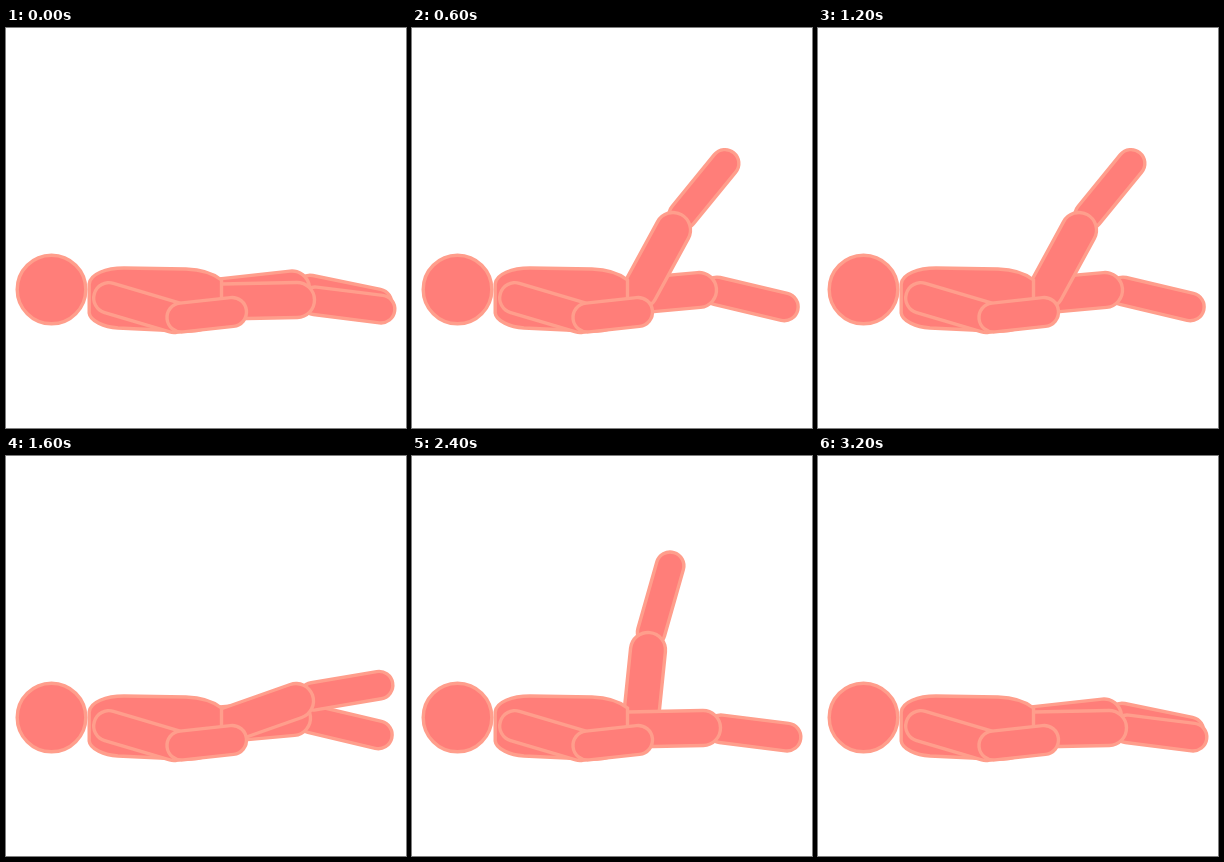
Write an HTML page with a canvas that moves like this. It is 400 px wide and 400 px high and loops after 3400 ms.

```html
<!DOCTYPE html>
<html lang="en">
<head>
<meta charset="utf-8">
<title>Leg raises</title>
<style>
html, body { margin: 0; width: 100%; height: 100%; overflow: hidden; background: #fff; }
canvas { display: block; width: 400px; height: 400px; }
</style>
</head>
<body>
<canvas id="stage" width="400" height="400"></canvas>
<script>
const ctx = document.getElementById('stage').getContext('2d');
const SKIN = '#ff7e79', EDGE = '#ff9e8c', LINE = 3.4;
const LOOP = 3400, STEP = 200;
const THIGH_R = 19.2, SHIN_R = 15.5, KNEE_GAP = 18;
const HIP_UP = [229, 262];

// Knee x, y and direction to the foot in degrees, from lying to upright
const near = {
  hip: [216, 273.5], reach: 84.5,
  keys: [[291, 272, -6.2], [290, 245, 10.8], [281, 216, 30], [261, 202, 52], [232, 194.5, 85.6]]
};
const far = {
  hip: [213, 268.5], reach: 87,
  keys: [[286, 260.5, -9.5], [275, 237, 11.7], [267, 208.5, 42], [236, 194, 75.3]]
};
// The far leg sags a little while the near one works
const SAG = [287, 262, -11.2];

const head = new Path2D();
head.arc(45.5, 261.5, 34.3, 0, Math.PI * 2);

const torso = new Path2D(
  'M83.2 256 C84 246 100 240 118 240 L180 241 C196 241.5 208 246 215.5 252 ' +
  'L215.5 276 C215 294 200 303 185 303 L165 302.5 L112 300 ' +
  'C98 299 84 293 83.2 285 Z');

const mix = (a, b, u) => a + (b - a) * u;

function limb(x1, y1, x2, y2, r) {
  ctx.lineCap = 'round';
  for (const [color, width] of [[EDGE, 2 * r], [SKIN, 2 * (r - LINE)]]) {
    ctx.beginPath();
    ctx.moveTo(x1, y1);
    ctx.lineTo(x2, y2);
    ctx.strokeStyle = color;
    ctx.lineWidth = width;
    ctx.stroke();
  }
}

function outline(path) {
  ctx.fillStyle = SKIN;
  ctx.strokeStyle = EDGE;
  ctx.lineWidth = LINE;
  ctx.fill(path);
  ctx.stroke(path);
}

function drawLeg({ hip, reach, keys }, [kx, ky, degrees]) {
  // The hip rolls towards its upright place as the knee rises
  const low = keys[0][1], high = keys.at(-1)[1];
  const lift = (low - ky) / (low - high);
  const [hx, hy] = hip.map((v, i) => mix(v, HIP_UP[i], lift));
  const thigh = Math.atan2(hy - ky, kx - hx);
  const foot = degrees * Math.PI / 180;
  const fromKnee = (angle, d) => [kx + d * Math.cos(angle), ky - d * Math.sin(angle)];

  limb(...fromKnee((thigh + foot) / 2, KNEE_GAP), ...fromKnee(foot, reach), SHIN_R);
  limb(hx, hy, kx, ky, THIGH_R);
}

// Climbs one key per step, holds the last for two steps, then returns
const raise = (step, middle, top) => Math.max(0, top + 0.5 - Math.abs(step - middle));

function draw(t) {
  const step = Math.floor(t / STEP);
  const nearKey = raise(step, 4.5, 4);
  const farKey = raise(step, 12.5, 3);
  ctx.fillStyle = '#fff';
  ctx.fillRect(0, 0, 400, 400);
  drawLeg(far, nearKey > 0 ? SAG : far.keys[farKey]);
  drawLeg(near, near.keys[nearKey]);
  outline(torso);
  limb(103, 270, 168, 289.3, 17);
  limb(175.5, 289.5, 226, 284, 16.2);
  outline(head);
}

const start = performance.now();
function tick() {
  draw((performance.now() - start) % LOOP);
  requestAnimationFrame(tick);
}
tick();
</script>
</body>
</html>
```
